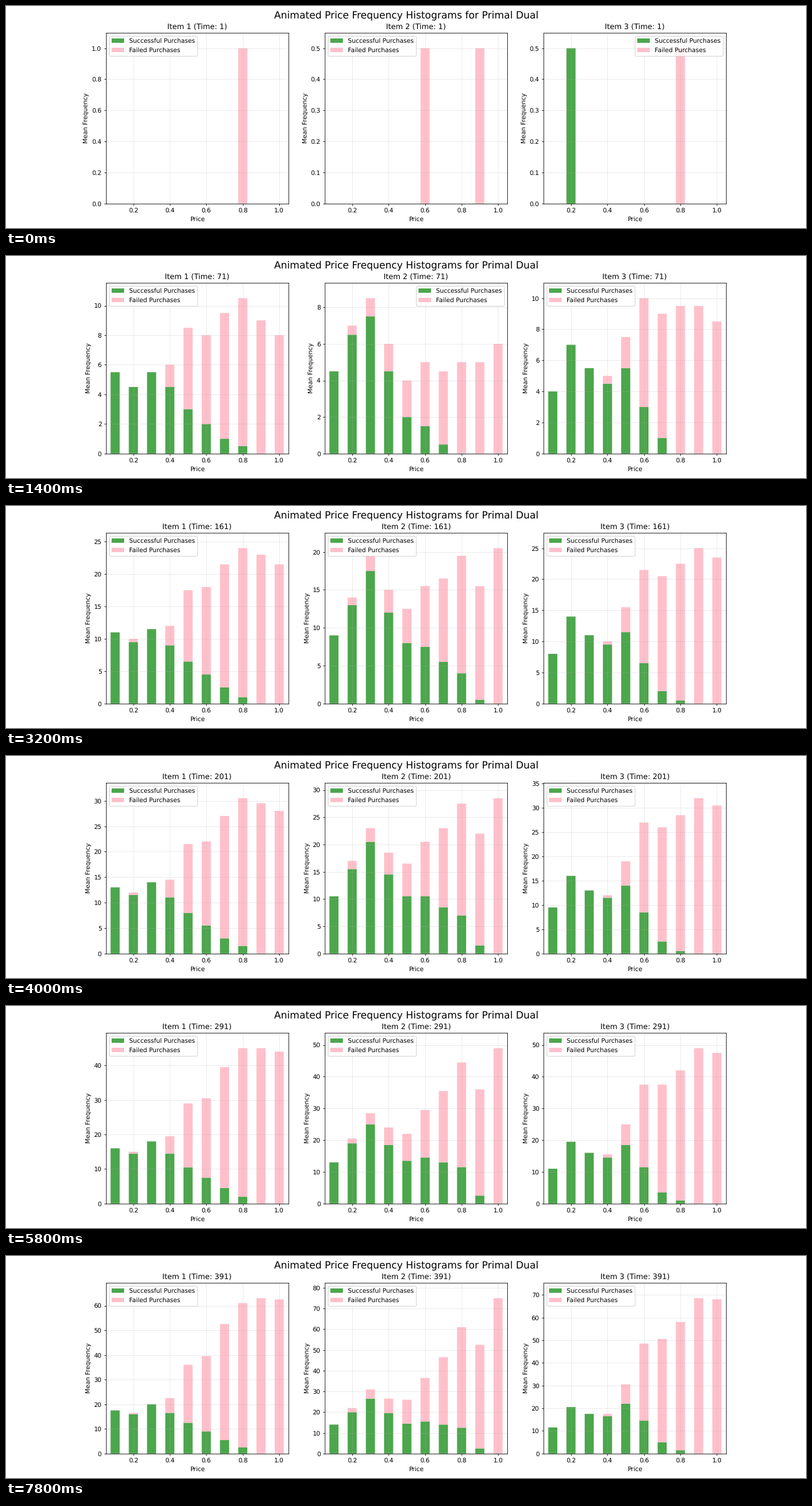
These frames come from a looping animation (1280 px wide and 356 px high, 8000 ms). A matplotlib script:

```python
import numpy as np
import matplotlib.pyplot as plt
from matplotlib.animation import FuncAnimation

WIDTH, HEIGHT, DPI = 1280, 356, 640 / 9
FRAMES, INTERVAL, STEP = 40, 200, 10
EPS = 1e-6  # keeps the pixel size from truncating downwards
PRICES = np.arange(1, 11) / 10

plt.rcParams["font.family"] = "DejaVu Sans"
plt.rcParams["text.hinting"] = "no_hinting"


class Item:
    """Purchase counts per price, growing from a first sale to their final heights."""

    def __init__(self, bought, failed, pace, fade, delay, drag,
                 first_bought=(), first_failed=()):
        self.bought = np.pad(bought, (0, len(PRICES) - len(bought)))
        self.failed = np.pad(failed, (len(PRICES) - len(failed), 0))
        self.first_bought = self.first(first_bought)
        self.first_failed = self.first(first_failed)
        self.out = pace - fade * PRICES        # how early sales level off
        self.late = 1 + delay * PRICES ** 3    # how late dear sales begin
        self.power = drag * np.sqrt(PRICES)    # how failures speed up

    @staticmethod
    def first(sales):
        heights = np.zeros(len(PRICES))
        for price, height in sales:
            heights[round(10 * price) - 1] = height
        return heights

    def at(self, s):
        sold = (1 - (1 - s) ** self.out) ** self.late
        lost = s ** self.power
        bought = self.first_bought + (self.bought - self.first_bought) * sold
        failed = self.first_failed + (self.failed - self.first_failed) * lost
        return np.round(2 * bought) / 2, np.round(2 * failed) / 2


# Final heights run from the lowest price up (bought) and to the highest (failed).
ITEMS = [
    Item(bought=[17.5, 16, 20, 16.5, 12.5, 9, 5.5, 2.5],
         failed=[0.5, 0, 6, 23.5, 30.5, 47, 58.5, 63, 62.5],
         pace=2.0, fade=1.2, delay=0, drag=1.2,
         first_failed=[(0.8, 1)]),
    Item(bought=[14, 20, 26.5, 19.5, 14.5, 15.5, 14, 12.5, 2.5],
         failed=[2, 4.5, 7, 11.5, 21, 32.5, 48.5, 50, 75],
         pace=1.8, fade=-1.8, delay=9, drag=1.45,
         first_failed=[(0.6, 0.5), (0.9, 0.5)]),
    Item(bought=[11.5, 20.5, 17.5, 16.5, 22, 14.5, 5, 1.5],
         failed=[1, 8.5, 34, 45.5, 56.5, 68.5, 68],
         pace=2.5, fade=2.2, delay=0, drag=1.2,
         first_bought=[(0.2, 0.5)], first_failed=[(0.8, 0.5)]),
]

fig, axes = plt.subplots(
    1, 3, dpi=DPI, figsize=((WIDTH + EPS) / DPI, (HEIGHT + EPS) / DPI))
fig.suptitle("Animated Price Frequency Histograms for Primal Dual", fontsize=16)


def draw_item(ax, number, item, frame):
    bought, failed = item.at(frame / (FRAMES - 1))
    ax.clear()
    ax.bar(PRICES, bought, width=0.05, color="green", alpha=0.7, snap=False,
           label="Successful Purchases")
    ax.bar(PRICES, failed, width=0.05, bottom=bought, color="pink", snap=False,
           label="Failed Purchases")
    ax.set_title(f"Item {number} (Time: {1 + STEP * frame})")
    ax.set_xlabel("Price")
    ax.set_ylabel("Mean Frequency")
    ax.set_xlim(0.05, 1.05)
    ax.set_ylim(0, 1.1 * (bought + failed).max())
    ax.grid(True, alpha=0.3)
    ax.legend()


def update(frame):
    for number, (ax, item) in enumerate(zip(axes, ITEMS), 1):
        draw_item(ax, number, item, frame)
    return []


anim = FuncAnimation(fig, update, frames=FRAMES, interval=INTERVAL,
                     init_func=lambda: update(0), repeat=True, repeat_delay=0)
plt.show()
```
